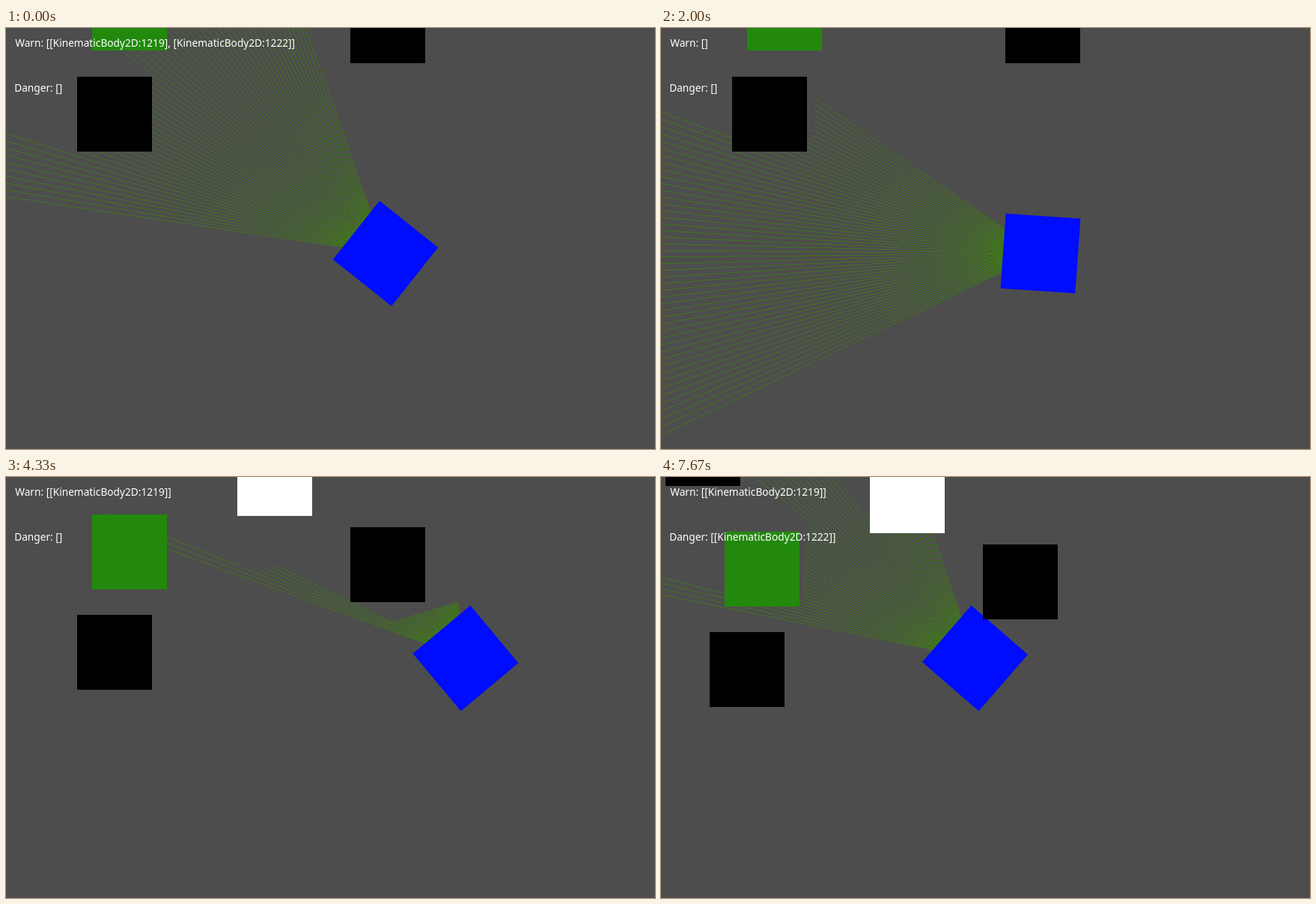
An HTML page with a canvas that plays this animation: 867 by 562 pixels, repeating every 8000 ms.

```html
<!DOCTYPE html>
<html lang="en">
<head>
<meta charset="utf-8">
<title>Vision cone</title>
<style>
html, body { margin: 0; height: 100%; overflow: hidden; background: #4d4d4d; }
canvas { display: block; }
</style>
</head>
<body>
<canvas id="stage" width="867" height="562"></canvas>
<script>
const ctx = document.getElementById('stage').getContext('2d');
const W = 867, H = 562, SIZE = 100, FAR = 900, LOOP = 8000, STEPS = 24, STEP = 333.34;
const rad = d => d * Math.PI / 180;
const clamp = (v, lo, hi) => Math.min(hi, Math.max(lo, v));

// Key points: step, then values; straight lines between them.
// Headings are degrees clockwise from left.
const turn = [[0, 38.5], [1, 37.5], [2, 23.7], [4, 1], [5, 1], [6, 4], [10, 75.5], [11, 83],
  [14, 33.6], [15, 35.1], [16, 35.1], [18, 52], [19, 31.5], [22, 37], [23, 41]];
const path = [[0, 507, 301], [9, 507, 301], [10, 506.5, 298], [11, 507, 248], [12, 540, 242],
  [13, 614, 242], [15, 618, 239.5], [16, 618, 239.5], [17, 590, 284], [19, 488.5, 242.5],
  [21, 419.5, 242]];
const scroll = [[10, 0, 0], [12, 0, 119.4], [13, 0, 119.4], [14, -30, 119.4], [18, -30, 119.4],
  [19, -30, 130.3], [21, -30, 142.4]];

function along(keys, k) {
  const i = keys.findIndex(key => key[0] >= k);
  const b = keys.at(i), a = i > 0 ? keys[i - 1] : b;
  const u = a === b ? 0 : (k - a[0]) / (b[0] - a[0]);
  return a.slice(1).map((v, j) => v + (b[j + 1] - v) * u);
}

const blocks = [
  [95, 65, '#000'], [460, -52.9, '#000'], [36, -230.4, '#000'],
  [115, -69.6, '#22890d'], [309, -167.85, '#fff']
];

const A = '[KinematicBody2D:1219]', B = '[KinematicBody2D:1222]';
const reports = [[0, A + ', ' + B, ''], [3, A, ''], [5, '', ''], [7, A, ''],
  [18, A + ', ' + B, ''], [22, A, B]];

function world(k) {
  const [x, y] = along(path, k), [heading] = along(turn, k), [ox, oy] = along(scroll, k);
  const boxes = blocks.map(([bx, by, color]) => [bx + ox, Math.round(by + oy), color]);
  return { x, y, heading, boxes };
}

// Distance from the player to the nearest block in direction a
function cast({ x, y, boxes }, a) {
  const dx = -Math.cos(rad(a)), dy = -Math.sin(rad(a));
  let best = FAR;
  for (const [bx, by] of boxes) {
    const tx = [(bx - x) / dx, (bx + SIZE - x) / dx];
    const ty = [(by - y) / dy, (by + SIZE - y) / dy];
    const near = Math.max(Math.min(...tx), Math.min(...ty));
    const far = Math.min(Math.max(...tx), Math.max(...ty));
    if (near > 0 && near < far) best = Math.min(best, near);
  }
  return best;
}

// Hard-edged one pixel line
function ray(x, y, a, len) {
  const dx = -Math.cos(rad(a)), dy = -Math.sin(rad(a));
  const major = Math.max(Math.abs(dx), Math.abs(dy));
  const n = Math.round(len * major);
  for (let i = 0; i <= n; i++) {
    const px = Math.floor(x + dx / major * i), py = Math.floor(y + dy / major * i);
    if (px < 0 || py < 0 || px >= W || py >= H) break;
    ctx.fillRect(px, py, 1, 1);
  }
}

function draw(k) {
  const now = world(k), before = world(Math.max(0, k - 1));
  const { x, y, heading, boxes } = now;

  ctx.fillStyle = '#4d4d4d';
  ctx.fillRect(0, 0, W, H);

  // Ray lengths trail behind: they were measured from the previous pose
  const lag = clamp(before.heading - heading, -3, 21);
  const start = heading - 30 - 0.15 * Math.min(0, lag);
  const count = lag < 0 ? 61 : 63;
  ctx.fillStyle = '#41731f';
  for (let i = 0; i < count; i++) {
    ray(x, y, start + i, cast(before, start + i + lag));
  }

  ctx.save();
  ctx.translate(x, y);
  ctx.rotate(rad(heading));
  ctx.fillStyle = '#000cff';
  ctx.fillRect(-SIZE / 2, -SIZE / 2, SIZE, SIZE);
  ctx.restore();

  for (const [bx, by, color] of boxes) {
    ctx.fillStyle = color;
    ctx.fillRect(bx, by, SIZE, SIZE);
  }

  const [, warn, danger] = reports.findLast(r => r[0] <= k);
  ctx.fillStyle = '#fff';
  ctx.font = '13.7px "Noto Sans", "Open Sans", sans-serif';
  ctx.fillText(`Warn: [${warn}]`, 12.2, 25);
  ctx.fillText(`Danger: [${danger}]`, 11.2, 85);
}

let shown = -1;
const t0 = performance.now();
function tick() {
  const t = (performance.now() - t0) % LOOP;
  const k = Math.min(STEPS - 1, Math.floor((t + 3.4) / STEP));
  if (k !== shown) draw(shown = k);
  requestAnimationFrame(tick);
}
tick();
</script>
</body>
</html>
```
